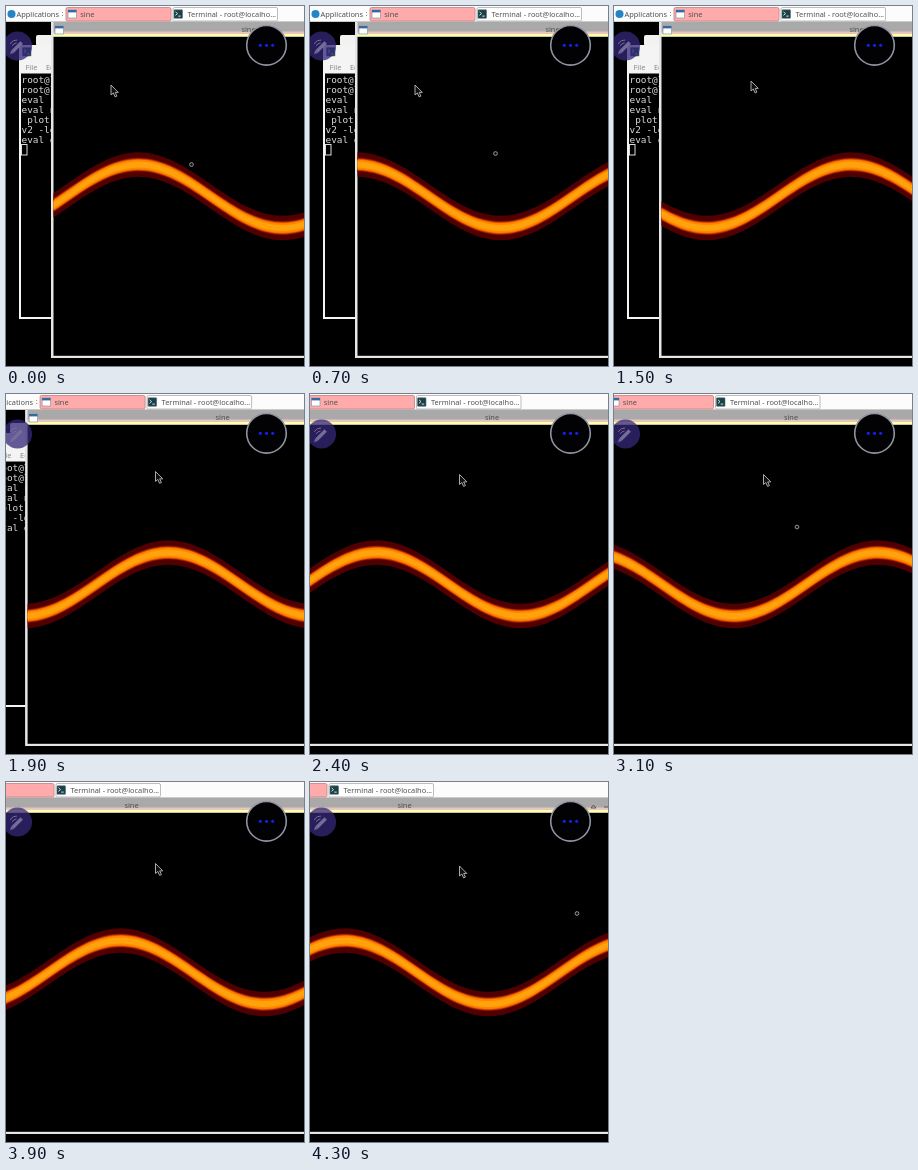
These frames come from a looping animation (298x360 px, 4400 ms). An HTML page:

```html
<!DOCTYPE html>
<html lang="en">
<head>
<meta charset="utf-8">
<title>Sine plot</title>
<style>
  html, body { margin: 0; width: 100%; height: 100%; overflow: hidden; background: #000; }
  svg { display: block; width: 100%; height: 100%; }
  .ui { font: 7.4px "Noto Sans", sans-serif; fill: #505050; }
  .term { font: 9.4px "DejaVu Sans Mono", monospace; fill: #dcdcdc; }
</style>
</head>
<body>
<svg viewBox="0 0 298 360">
  <defs>
    <clipPath id="inside"><rect x="47.5" y="31" width="480" height="318"/></clipPath>
    <g id="win">
      <rect width="8.5" height="8" fill="#fff" stroke="#8796a5" stroke-width=".7"/>
      <rect width="8.5" height="2.4" fill="#376a9c"/>
    </g>
    <g id="shell">
      <rect width="8.5" height="8.5" rx=".6" fill="#1c4048" stroke="#53707a" stroke-width=".6"/>
      <path d="M1.5 2l2 1.8-2 1.8M4.2 6.3h2.5" fill="none" stroke="#e6f0f0" stroke-width=".9"/>
    </g>
  </defs>
  <rect width="298" height="360"/>

  <g id="desk">
    <!-- terminal window -->
    <rect x="30" y="29" width="20" height="11" rx="2" fill="#f2f2f0"/>
    <rect x="13" y="39" width="60" height="274" fill="#f4f4f4"/>
    <rect x="15" y="67.5" width="50" height="243.5"/>
    <use href="#shell" x="16.5" y="41.5"/>
    <text class="ui" y="63.5" style="fill:#888"><tspan x="19.5">File</tspan><tspan x="40">Edit</tspan></text>
    <g id="lines" class="term"></g>
    <rect x="15.5" y="138.5" width="5.5" height="10.5" fill="none" stroke="#ddd"/>

    <!-- plot window -->
    <rect x="45" y="16" width="500" height="336" fill="#e6e6e6"/>
    <rect x="47.5" y="16" width="490" height="10" fill="#a9a9a9"/>
    <rect x="47.5" y="25.5" width="490" height="2.5" fill="#e8c6bc"/>
    <rect x="47.5" y="28" width="490" height="2.8" fill="#ffffb4"/>
    <rect x="47.5" y="30.8" width="490" height="319"/>
    <use href="#win" x="49" y="20"/>
    <text class="ui" x="242.5" y="26" text-anchor="middle">sine</text>
    <path d="M429 26l2.5-3 2.5 3zM442 25h5" fill="none" stroke="#444" stroke-width=".8"/>
    <g clip-path="url(#inside)"><g id="wave"></g></g>

    <!-- panel -->
    <rect width="540" height="15.8" fill="#fcfcfc"/>
    <circle cx="5.5" cy="8" r="4" fill="#2384c6"/>
    <text class="ui" x="10.5" y="10.5">Applications</text>
    <path d="M56.5 6v1M56.5 9v1" stroke="#999"/>
    <rect x="60" y="1.5" width="105" height="13.5" rx="1.5" fill="#ffabab" stroke="#c98a8a" stroke-width=".9"/>
    <use href="#win" x="62" y="4"/>
    <text class="ui" x="74.3" y="10.5">sine</text>
    <rect x="167" y="1.5" width="104.5" height="13.5" rx="1.5" fill="#fff" stroke="#b5b5b5" stroke-width=".9"/>
    <use href="#shell" x="168" y="3.8"/>
    <text class="ui" x="181.5" y="10.5">Terminal - root@localho...</text>
  </g>

  <circle id="touch" r="1.9" fill="#111" stroke="#a0a0a0" stroke-width=".9"/>
  <path id="arrow" d="M0 0v10l2.3-2 1.8 3.9 1.8-.8-1.7-3.7h3.1z" fill="#111" stroke="#bdbdbd" stroke-width=".9"/>

  <!-- floating buttons -->
  <circle cx="11.5" cy="40" r="14.6" fill="#352879" opacity=".76"/>
  <g fill="none" stroke="#746d96" stroke-linecap="round" transform="translate(-.8 0)">
    <path d="M7.5 45.5L16.5 36.5" stroke-width="3.4" stroke-linecap="butt"/>
    <path d="M5.3 47.6l1-3 2 2z" fill="#746d96" stroke-width=".5"/>
    <path d="M5 37.5q3-4 6.5-3.5M7 39.5q2-2.5 4-2.5" stroke-width="1"/>
  </g>
  <circle cx="260.5" cy="39.3" r="19.8" fill="#020204" stroke="#9194a2" stroke-width="1.6"/>
  <g fill="#1820e0">
    <circle cx="254.3" cy="39.3" r="1.6"/><circle cx="260.5" cy="39.3" r="1.6"/><circle cx="266.7" cy="39.3" r="1.6"/>
  </g>
</svg>
<script>
const LOOP = 4400, STEP = 100, CENTER = 149.5;
const WAVELENGTH = 288, SPEED = 122.3, PEAK = 132.5, MID = 190.3, AMP = 31.7;
const NS = "http://www.w3.org/2000/svg";
const $ = id => document.getElementById(id);

function add(parent, tag, attrs) {
  const el = document.createElementNS(NS, tag);
  for (const k in attrs) el.setAttribute(k, attrs[k]);
  return parent.appendChild(el);
}

["root@l", "root@l", "eval r", "eval n", "\u00a0plot ", "v2 -lg", "eval o"].forEach((s, i) => {
  add($("lines"), "text", { x: 15.5, y: 76.5 + i * 10.1 }).textContent = s;
});

// Glow bands, outermost first: vertical thickness and colour
const bands = [[24.5, "#500000"], [14, "#7c0c00"], [12.6, "#b43000"], [11, "#ee6400"], [9.4, "#ff8600"], [6, "#ffa20c"]]
  .map(([size, fill]) => ({ half: size / 2, path: add($("wave"), "path", { fill }) }));

// Pointer position on the desktop: [ms, value]
const pointerX = [[0, 105], [700, 105], [1100, 162], [1500, 137], [2250, 209], [2400, 210], [3100, 215], [3500, 235.5], [4300, 297.5]];
const pointerY = [[0, 79], [700, 79], [1500, 75], [2400, 80.5], [3100, 80.5], [3500, 79], [4300, 84]];
const touchX = [[0, 185.5], [700, 185.5], [3100, 183], [3500, 203], [4300, 267]];
const touchY = [[0, 158.5], [700, 147.5], [3100, 133], [4300, 131.5]];

function at(keys, t) {
  const i = keys.findIndex(k => k[0] > t);
  if (i < 0) return keys[keys.length - 1][1];
  const [t0, a] = keys[i - 1], [t1, b] = keys[i];
  return a + (b - a) * (t - t0) / (t1 - t0);
}

function curve(t) {
  const peak = PEAK - SPEED * t / 1000, points = [];
  for (let x = 40; x <= 480; x += 4) {
    points.push([x, MID - AMP * Math.cos((x - peak) * 2 * Math.PI / WAVELENGTH)]);
  }
  return points;
}

function bandPath(points, half) {
  const edge = dy => points.map(([x, y]) => x + " " + (y + dy).toFixed(2));
  return "M" + [...edge(-half), ...edge(half).reverse()].join("L") + "Z";
}

const move = (id, x, y) => $(id).setAttribute("transform", `translate(${x} ${y})`);

function draw(t) {
  const x = at(pointerX, t);
  move("desk", -Math.max(0, x - CENTER), 0); // the view pans once the pointer reaches its centre
  move("arrow", Math.min(x, CENTER), at(pointerY, t));
  move("touch", at(touchX, t), at(touchY, t));
  const touching = t < 800 || (t >= 3000 && t < 3300) || t >= 4000;
  $("touch").style.display = touching ? "" : "none";
  const points = curve(t);
  for (const b of bands) b.path.setAttribute("d", bandPath(points, b.half));
}

const start = performance.now();
function tick() {
  const t = (performance.now() - start) % LOOP;
  draw(Math.floor(t / STEP) * STEP);
  requestAnimationFrame(tick);
}
tick();
</script>
</body>
</html>
```
